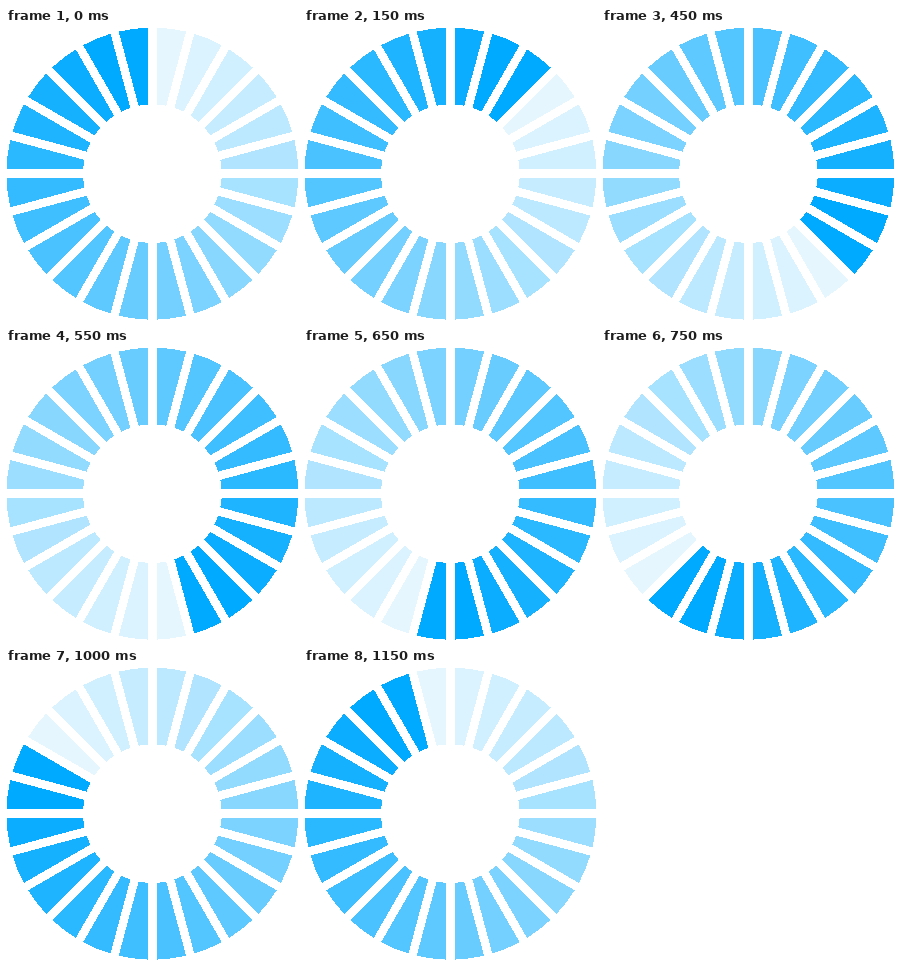
Animation of 292 by 292 pixels, one loop 1200 ms. Source, as an HTML page:

```html
<!DOCTYPE html>
<html lang="en">
<head>
<meta charset="utf-8">
<title>Loading spinner</title>
<style>
  html, body { margin: 0; width: 100%; height: 100%; overflow: hidden; background: #fff; }
  svg { display: block; width: 100vw; height: 100vh; shape-rendering: crispEdges; }
  path { fill: #0af; animation: fade 1200ms steps(23, jump-none) infinite; }
  /* full colour for two steps, then an even fade */
  @keyframes fade {
    from, 4.1666% { fill-opacity: 1; }
    to { fill-opacity: 0.1; }
  }
</style>
</head>
<body>
<svg viewBox="0 0 292 292"><g id="ring" transform="translate(146.4 145.65)"></g></svg>
<script>
  const COUNT = 24, STEP = 50, OUTER = 146, INNER = 69.3, HALF_GAP = 4.25;
  const slice = 2 * Math.PI / COUNT;
  const ring = document.getElementById('ring');

  const point = (r, a) => `${(r * Math.sin(a)).toFixed(3)} ${(-r * Math.cos(a)).toFixed(3)}`;

  // Wedge whose sides stay parallel to the gaps next to it
  function wedge(i) {
    const a = i * slice, b = a + slice;
    const out = Math.asin(HALF_GAP / OUTER), inn = Math.asin(HALF_GAP / INNER);
    return `M${point(OUTER, a + out)}A${OUTER} ${OUTER} 0 0 1 ${point(OUTER, b - out)}` +
      `L${point(INNER, b - inn)}A${INNER} ${INNER} 0 0 0 ${point(INNER, a + inn)}Z`;
  }

  for (let i = 0; i < COUNT; i++) {
    const path = document.createElementNS('http://www.w3.org/2000/svg', 'path');
    path.setAttribute('d', wedge(i));
    path.style.animationDelay = `${(i + 1 - COUNT) * STEP}ms`;
    ring.append(path);
  }
</script>
</body>
</html>
```
